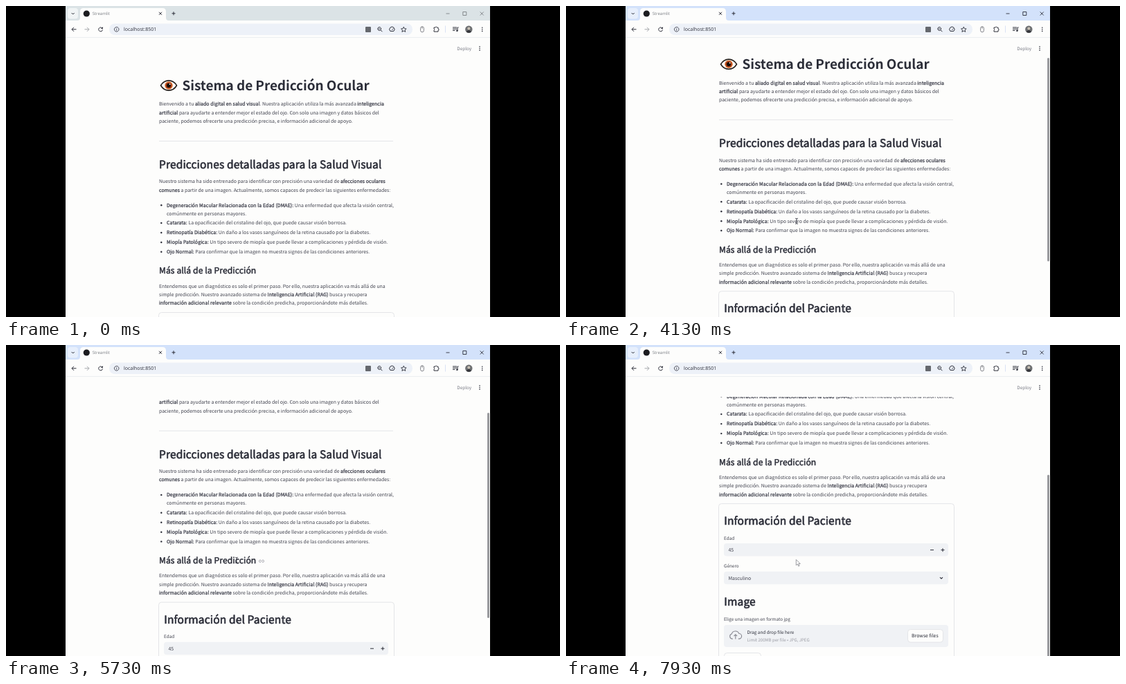
These frames come from a looping animation (800 px wide and 450 px high, 8000 ms). An HTML page with a canvas:

```html
<!DOCTYPE html>
<html lang="es">
<head>
<meta charset="utf-8">
<title>Sistema de Predicción Ocular</title>
<style>
html, body { margin: 0; width: 100%; height: 100%; overflow: hidden; background: #000; }
canvas { display: block; width: 800px; height: 450px; }
</style>
</head>
<body>
<canvas id="stage" width="800" height="450"></canvas>
<script>
const ctx = document.getElementById('stage').getContext('2d');
const LOOP = 8000, TICK = 71.3;
const PAGE = '#fdfdfc', INK = '#2b2d38', TEXT = '#40424e', MUTED = '#9a9ba3', LINE = '#e4e5e8', FIELD = '#f0f2f5';
const SANS = '"Noto Sans CJK JP","Noto Sans CJK SC","Noto Sans CJK",sans-serif';
const UI = '"Open Sans","Noto Sans",sans-serif';
const BODY = 6.93, SMALL = 6.4;

// Text between asterisks is semi-bold: regular glyphs thickened by a thin outline.
function text(str, x, y, { size = BODY, color = TEXT, family = SANS, weight = 400, spacing = 0, semiSpacing = 0.012 } = {}) {
  ctx.fillStyle = ctx.strokeStyle = color;
  ctx.lineWidth = size * 0.04;
  ctx.lineJoin = 'round';
  ctx.textRendering = 'geometricPrecision';
  ctx.font = `${weight} ${size}px ${family}`;
  str.split('*').forEach((run, i) => {
    const semi = i % 2 === 1;
    ctx.letterSpacing = `${(semi ? semiSpacing : spacing) * size}px`;
    ctx.fillText(run, x, y);
    if (semi) ctx.strokeText(run, x, y);
    x += ctx.measureText(run).width;
  });
}

function heading(str, x, y, size = 15.55) {
  text(`*${str}*`, x, y, { size, color: INK, semiSpacing: 0.008 });
}

function box(x, y, w, h, r, fill, stroke) {
  ctx.beginPath();
  ctx.roundRect(x, y, w, h, r);
  if (fill) { ctx.fillStyle = fill; ctx.fill(); }
  if (stroke) { ctx.strokeStyle = stroke; ctx.lineWidth = 1; ctx.stroke(); }
}

function dot(x, y, r, fill) {
  ctx.beginPath();
  ctx.arc(x, y, r, 0, 7);
  ctx.fillStyle = fill;
  ctx.fill();
}

// SVG path data, placed at x, y.
function icon(d, x, y, color = INK, width = 1, fill) {
  ctx.save();
  ctx.translate(x, y);
  const path = new Path2D(d);
  if (fill) { ctx.fillStyle = fill; ctx.fill(path); }
  ctx.strokeStyle = color;
  ctx.lineWidth = width;
  ctx.lineJoin = 'round';
  ctx.stroke(path);
  ctx.restore();
}

const CROSS = 'M-2-2L2 2M2-2L-2 2', PLUS = 'M-2.5 0H2.5M0-2.5V2.5', MINUS = 'M-2.5 0H2.5';
const CHEVRON = 'M-2-1L0 1L2-1';
const ARROW = 'M3.5 0H-3M0-3L-3 0L0 3';
const LINK = 'M-.8 1.6H-2a1.6 1.6 0 0 1 0-3.2H-.8M.8-1.6H2a1.6 1.6 0 0 1 0 3.2H.8M-1.6 0H1.6';

function menuDots(x, y) {
  for (const dy of [-2.6, 0, 2.6]) dot(x, y + dy, 0.8, INK);
}

function eye(x, y) {
  icon('M-11.5 0C-6-9.5 6-9.5 11.5 0C6 9.5-6 9.5-11.5 0Z', x, y, '#26201c', 1.6, '#fff');
  dot(x, y, 5.8, '#e07a3a');
  dot(x, y, 4.6, '#a63c18');
  dot(x, y, 2.9, '#160c05');
  dot(x + 1.6, y - 1.8, 0.9, '#fff');
}

function intro() {
  eye(235, 115);
  text('Sistema de Predicción Ocular', 254.5, 122, { size: 18.97, color: INK, weight: 700, spacing: -0.003 });
  text('Bienvenido a tu *aliado digital en salud visual*. Nuestra aplicación utiliza la más avanzada *inteligencia*', 221, 144.3);
  text('*artificial* para ayudarte a entender mejor el estado del ojo. Con solo una imagen y datos básicos del', 221, 156.7);
  text('paciente, podemos ofrecerte una predicción precisa, e información adicional de apoyo.', 221, 169.2);
  ctx.fillStyle = LINE;
  ctx.fillRect(221, 195, 338, 1);
  heading('Predicciones detalladas para la Salud Visual', 221, 234.8);
  text('Nuestro sistema ha sido entrenado para identificar con precisión una variedad de *afecciones oculares*', 221, 256.3);
  text('*comunes* a partir de una imagen. Actualmente, somos capaces de predecir las siguientes enfermedades:', 221, 268.7);
  const items = [
    [290.5, '*Degeneración Macular Relacionada con la Edad (DMAE):* Una enfermedad que afecta la visión central,'],
    [316.3, '*Catarata:* La opacificación del cristalino del ojo, que puede causar visión borrosa.'],
    [330.3, '*Retinopatía Diabética:* Un daño a los vasos sanguíneos de la retina causado por la diabetes.'],
    [344.3, '*Miopía Patológica:* Un tipo severo de miopía que puede llevar a complicaciones y pérdida de visión.'],
    [358, '*Ojo Normal:* Para confirmar que la imagen no muestra signos de las condiciones anteriores.'],
  ];
  for (const [y, item] of items) {
    dot(224.3, y - 2.3, 1.2, INK);
    text(item, 232, y);
  }
  text('comúnmente en personas mayores.', 232, 302.5);
  heading('Más allá de la Predicción', 221, 387.4, 12.1);
  text('Entendemos que un diagnóstico es solo el primer paso. Por ello, nuestra aplicación va más allá de una', 221, 407.6);
  text('simple predicción. Nuestro avanzado sistema de *Inteligencia Artificial (RAG)* busca y recupera', 221, 420);
  text('*información adicional relevante* sobre la condición predicha, proporcionándote más detalles.', 221, 432.4);
}

function form() {
  box(220.5, 443.5, 340, 260, 4, null, LINE);
  heading('Información del Paciente', 228.3, 473.9);
  text('Edad', 228, 495.4, { size: SMALL });
  box(228, 501, 324, 18.5, 4, FIELD);
  text('45', 234.5, 513);
  icon(MINUS, 528.5, 510.5);
  icon(PLUS, 544, 510.5);
  text('Género', 228, 536.3, { size: SMALL });
  box(228, 541.7, 324, 18.5, 4, FIELD);
  text('Masculino', 234.5, 553.6);
  icon(CHEVRON, 542, 551, INK, 1.1);
  heading('Image', 228.3, 591.3);
  text('Elige una imagen en formato jpg', 228, 612.4, { size: SMALL });
  box(228, 619, 324, 32, 4, FIELD);
  icon('M-4 4.5H-5a3.6 3.6 0 0 1-.6-7a5.6 5.6 0 0 1 10.6-.6a3.8 3.8 0 0 1 0 7.6H4M0 5V-1.5M-2.3 .6L0-1.8L2.3 .6', 244.8, 634.5, '#85868f', 1.1);
  text('Drag and drop file here', 261.5, 631.5, { size: SMALL, color: INK });
  text('Limit 200MB per file • JPG, JPEG', 261.5, 642.6, { size: 6.1, color: MUTED });
  box(493.5, 625.5, 51, 18.5, 4, PAGE, LINE);
  text('Browse files', 499, 637, { color: INK });
  box(228.5, 659.5, 53, 18.5, 4, PAGE, LINE);
}

function chrome(focused) {
  const tone = focused ? INK : '#7c8084';
  ctx.fillStyle = focused ? '#d3e2fb' : '#dbe3e6';
  ctx.fillRect(86, 0, 613, 21);
  box(89, 3, 15, 15.5, 4, focused ? '#e7effc' : '#f0f4f5');
  icon(CHEVRON, 96.7, 11, INK);
  icon('M103 21Q107 21 107 17V8Q107 3 112 3H226Q231 3 231 8V17Q231 21 235 21Z', 0, 0, 'transparent', 0, PAGE);
  dot(116.3, 11, 4.6, '#1c1c20');
  text('Streamlit', 124.7, 13.2, { size: 6, color: '#7b7e84', family: UI });
  icon(CROSS, 223, 10.8, INK);
  icon(PLUS, 242, 10.8, INK);
  icon(MINUS, 638, 11, tone, 0.9);
  icon('M-2.5-2.5H2.5V2.5H-2.5Z', 662.3, 11, tone, 0.9);
  icon('M-2.5-2.5L2.5 2.5M2.5-2.5L-2.5 2.5', 687.2, 11, tone, 0.9);
}

function toolbar() {
  ctx.fillStyle = PAGE;
  ctx.fillRect(86, 21, 613, 54);
  ctx.fillStyle = '#eceef0';
  ctx.fillRect(86, 45, 613, 1);
  box(149, 25.5, 438, 16.5, 8, '#edf1f8');
  icon(ARROW, 98, 33.8);
  icon('M-3.5 0H3M0-3L3 0L0 3', 117, 33.8, '#a6a8ac');
  icon('M2.4-1.6A2.9 2.9 0 1 0 2.9 .6M2.9-3.2V-1.1H.8', 136.6, 33.8);
  icon('M3.3 0A3.3 3.3 0 1 1 3.3-.01M0-.4V1.8M0-1.9V-1.1', 159.7, 33.8, TEXT, 0.9);
  text('localhost:8501', 170, 36.1, { size: 7, color: INK, family: UI });
  box(519, 30, 8, 8, 1, '#65686e');
  icon('M1.6-.8A2.4 2.4 0 1 1 1.6-.81M.9 .9L3.4 3.4M-1.8-.8H.2', 540, 33.8);
  icon('M-2.4 2.6A3.6 3.6 0 1 1 2.6 2.6H-2.4M0 .8L2-1.2', 557.3, 33.8);
  icon('M0-3.8L1.1-1.3L3.8-1L1.8 .8L2.4 3.4L0 2L-2.4 3.4L-1.8 .8L-3.8-1L-1.1-1.3Z', 574.3, 34, INK, 0.9);
  icon('M-2.4-1.6A2.4 2.4 0 0 1 2.4-1.6V1.6A2.4 2.4 0 0 1-2.4 1.6ZM0-4V-1', 601, 33.8, '#75787e', 0.9);
  icon('M-3-2.5H-1A1.2 1.2 0 0 1 1.3-2.5H3V-.5A1.1 1.1 0 0 1 3 1.7V3.5H-3V1.5A1.1 1.1 0 0 0-3-.5Z', 621, 33.6);
  ctx.fillStyle = '#d9e3f4';
  ctx.fillRect(634, 28.5, 1, 10);
  icon('M-4-2.8H2M-4-.6H2M-4 1.6H-.5M3 2V-2.8H4.5', 649, 33.8);
  dot(651.4, 35.8, 1.3, INK);
  dot(668.3, 33.8, 5.2, '#6f7173');
  dot(668.3, 32.6, 2, '#c8c0b4');
  icon('M-3.6 3.4Q0-1 3.6 3.4Q0 6.4-3.6 3.4Z', 668.3, 33.8, 'transparent', 0, '#34353a');
  menuDots(687.7, 33.8);
  text('Deploy', 651.3, 63.6, { size: 6.4, color: '#777984' });
  menuDots(684, 61.3);
}

// One notch of the mouse wheel, scrolled smoothly.
function wheel(t, start) {
  const p = Math.min(1, Math.max(0, (t - start) / 240));
  return TICK * p * p * (3 - 2 * p);
}

function cursor(t) {
  if (t < 3650) return;
  if (t < 6030) icon('M-1.8-4Q0-4 0-3Q0-4 1.8-4M0-3V3M-1.8 4Q0 4 0 3Q0 4 1.8 4', 333, 311.3, INK, 0.9);
  else icon('M0 0V8.2L2 6.5L3.4 9.6L4.8 9L3.4 6H6Z', 332.3, 310.5, '#85868c', 0.8, '#fff');
}

function draw(t) {
  const scroll = wheel(t, 4022) + wheel(t, 5760) + wheel(t, 7360);
  ctx.fillStyle = '#000';
  ctx.fillRect(0, 0, 800, 450);
  ctx.fillStyle = PAGE;
  ctx.fillRect(86, 0, 613, 450);

  ctx.save();
  ctx.beginPath();
  ctx.rect(86, 75, 613, 375);
  ctx.clip();
  ctx.translate(0, -scroll);
  intro();
  form();
  if (t > 4330 && t < 6000) icon(LINK, 369, 384, MUTED, 0.8);
  if (t > 6130 && t < 7870) icon(LINK, 421.5, 470, MUTED, 0.8);
  ctx.restore();

  toolbar();
  chrome(t >= 3000);
  if (t >= 1000) {
    const top = 75 + Math.max(0, 0.63 * scroll - 22);
    box(695, top, 3, 350 + 0.63 * scroll - top, 1.5, '#98999d');
  }
  cursor(t);
}

function frame() {
  draw(performance.now() % LOOP);
  requestAnimationFrame(frame);
}
frame();
</script>
</body>
</html>
```
